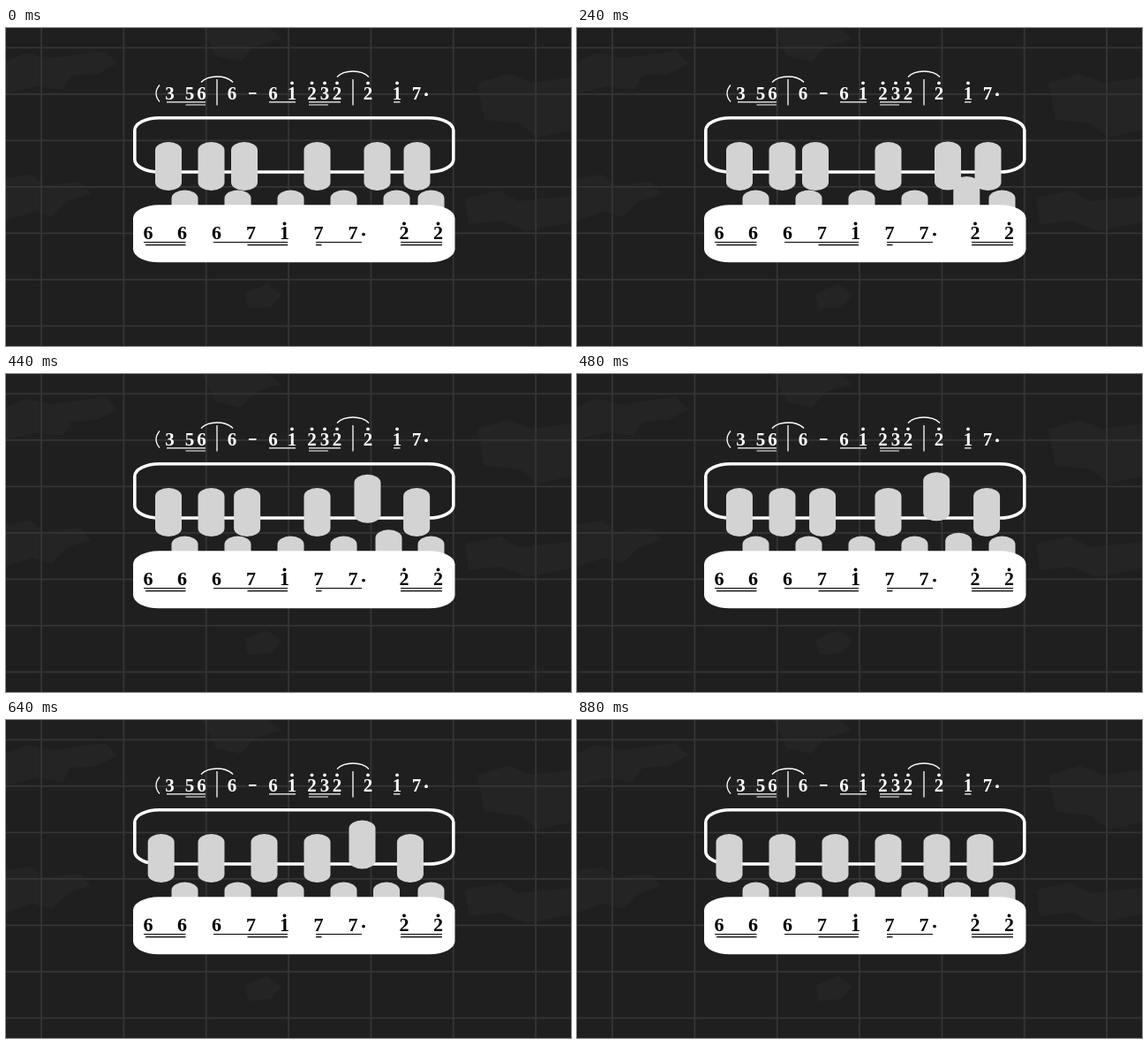
Animation, 640 px wide and 360 px high, one loop 920 ms. Source, as an HTML page:

```html
<!DOCTYPE html>
<html lang="en">
<head>
<meta charset="utf-8">
<title>Numbered notation</title>
<style>
  html, body { margin: 0; width: 100%; height: 100%; overflow: hidden; background: #1f1f1f; }
  svg { display: block; width: 640px; height: 360px; }
  text { font: bold 21px "Liberation Serif", serif; text-anchor: middle; }
  #low text { font-size: 22px; }
</style>
</head>
<body>
<svg viewBox="0 0 640 360">
  <rect width="640" height="360" fill="#1f1f1f"/>
  <g id="stains" fill="#242424"/>
  <path id="grid" stroke="#353535" stroke-width="1.8" fill="none"/>
  <rect x="145.8" y="101.8" width="361" height="61.2" rx="28" ry="14" fill="none" stroke="#fff" stroke-width="3.6"/>
  <g id="bars" fill="#d3d3d3"/>
  <rect x="144" y="200.3" width="364.5" height="65" rx="29" ry="15" fill="#fff"/>
  <g id="top" fill="#fff" stroke="none"/>
  <g id="low" fill="#000"/>
</svg>
<script>
const LOOP = 920, STEP = 40;
const $ = id => document.getElementById(id);

function add(parent, tag, attrs, text) {
  const el = document.createElementNS("http://www.w3.org/2000/svg", tag);
  for (const k in attrs) el.setAttribute(k, attrs[k]);
  if (text) el.textContent = text;
  parent.appendChild(el);
  return el;
}

// Backdrop
let lines = "";
for (let i = 0; i < 7; i++) {
  lines += `M${40 + i * 93.35} 0V360M0 ${22.3 + i * 52.5}H640`;
}
$("grid").setAttribute("d", lines);
[
  "M0 38l22-10 30 6 60-8 14 14-22 12-30 2-10 16-30-4-34 8z",
  "M0 170l28-4 16 12 40-4 12 14-26 8-18 18-22-6-30 10z",
  "M222 0h76l14 12-30 8-16 18-28-6z",
  "M534 62l36-10 26 10 44-6v60l-38 8-20-16-40-4z",
  "M520 192l40-8 20 12 60-6v30l-50 10-30-12-36 4z",
  "M270 300l26-10 16 12-12 14-26 2z"
].forEach(d => add($("stains"), "path", { d }));

// Notes: [digit, centre x, octave dot]
function score(g, color, base, dotY, notes, rules) {
  for (const [n, x, dot] of notes) {
    add(g, "text", { x, y: base }, n);
    if (dot) add(g, "circle", { cx: x, cy: dotY, r: 1.9 });
  }
  add(g, "path", {
    d: rules.map(([x1, x2, y]) => `M${x1} ${y}H${x2}`).join(""),
    stroke: color, "stroke-width": 1.2, fill: "none"
  });
}

const top_ = $("top"), low = $("low");
score(top_, "#fff", 80.5, 62.3,
  [["3", 185.5], ["5", 208], ["6", 221.5], ["6", 256], ["6", 302.5], ["1", 324, 1],
   ["2", 346.5, 1], ["3", 361, 1], ["2", 375, 1], ["2", 410, 1], ["1", 443, 1], ["7", 465]],
  [[182, 226, 83.8], [203.5, 226, 87], [298, 328, 83.8], [343, 379, 83.8],
   [343, 365, 87], [439, 446.5, 83.8]]);
add(top_, "path", {
  d: "M174 64.5Q166 74 174 83.5M239 58V87.5M393 58V87.5" +
     "M221 61.5Q226 55 239 55T257 61.5M375 55.5Q380 49 393 49T411 55.5".replace(/T/g, "Q"),
  fill: "none"
}).remove();
add(top_, "path", {
  d: "M174 64.5Q166 74 174 83.5M239 58V87.5M393 58V87.5" +
     "M221 61.5C229 52.8 249 52.8 257 61.5M375 55.5C383 46.8 403 46.8 411 55.5",
  stroke: "#fff", "stroke-width": 1.3, fill: "none"
});
add(top_, "rect", { x: 275, y: 73, width: 8.5, height: 2 });
add(top_, "circle", { cx: 476, cy: 75.2, r: 1.9 });

score(low, "#000", 239, 221.5,
  [["6", 161], ["6", 199.5], ["6", 238.5], ["7", 277.5], ["1", 315.5, 1],
   ["7", 354], ["7", 393], ["2", 451, 1], ["2", 489.5, 1]],
  [[156, 203.5, 242.5], [158, 203.5, 245.6], [235, 319, 242.5], [273.5, 319, 245.6],
   [351, 403, 242.5], [351, 357.5, 245.6], [447, 494, 242.5], [447, 494, 245.6]]);
add(low, "circle", { cx: 405, cy: 233.6, r: 1.9 });

// Bars: start position and eased moves [start ms, end ms, distance]
const bars = [
  { x: 169, y: 129, dx: [[470, 730, -11.5]] },
  { x: 217.5, y: 129 },
  { x: 255, y: 129, dx: [[385, 620, 22.5]] },
  { x: 337.5, y: 129 },
  { x: 405.5, y: 129,
    dx: [[200, 600, -17], [660, 880, 4]],
    dy: [[210, 540, -19.5], [540, 880, 19.5]] },
  { x: 450.5, y: 129, dx: [[400, 720, -9]] },
  ...[187.5, 247.5, 307.5, 367.5].map(x => ({ x, y: 183.5 })),
  { x: 427.5, y: 183.5,
    dx: [[160, 560, -11.5]],
    dy: [[0, 280, -16.5], [300, 560, 16.5]] },
  { x: 466.5, y: 183.5 }
];
for (const b of bars) {
  b.el = add($("bars"), "rect", { x: b.x, y: b.y, width: 30, height: 55, rx: 15, ry: 9.5 });
}

function travel(moves = [], t) {
  return moves.reduce((sum, [from, to, dist]) => {
    const p = Math.min(1, Math.max(0, (t - from) / (to - from)));
    return sum + dist * p * p * (3 - 2 * p);
  }, 0);
}

function draw(now) {
  const t = Math.floor((now % LOOP) / STEP) * STEP;
  for (const b of bars) {
    b.el.setAttribute("x", b.x + travel(b.dx, t));
    b.el.setAttribute("y", b.y + travel(b.dy, t));
  }
}

const start = performance.now();
(function tick() {
  draw(performance.now() - start);
  requestAnimationFrame(tick);
})();
</script>
</body>
</html>
```
